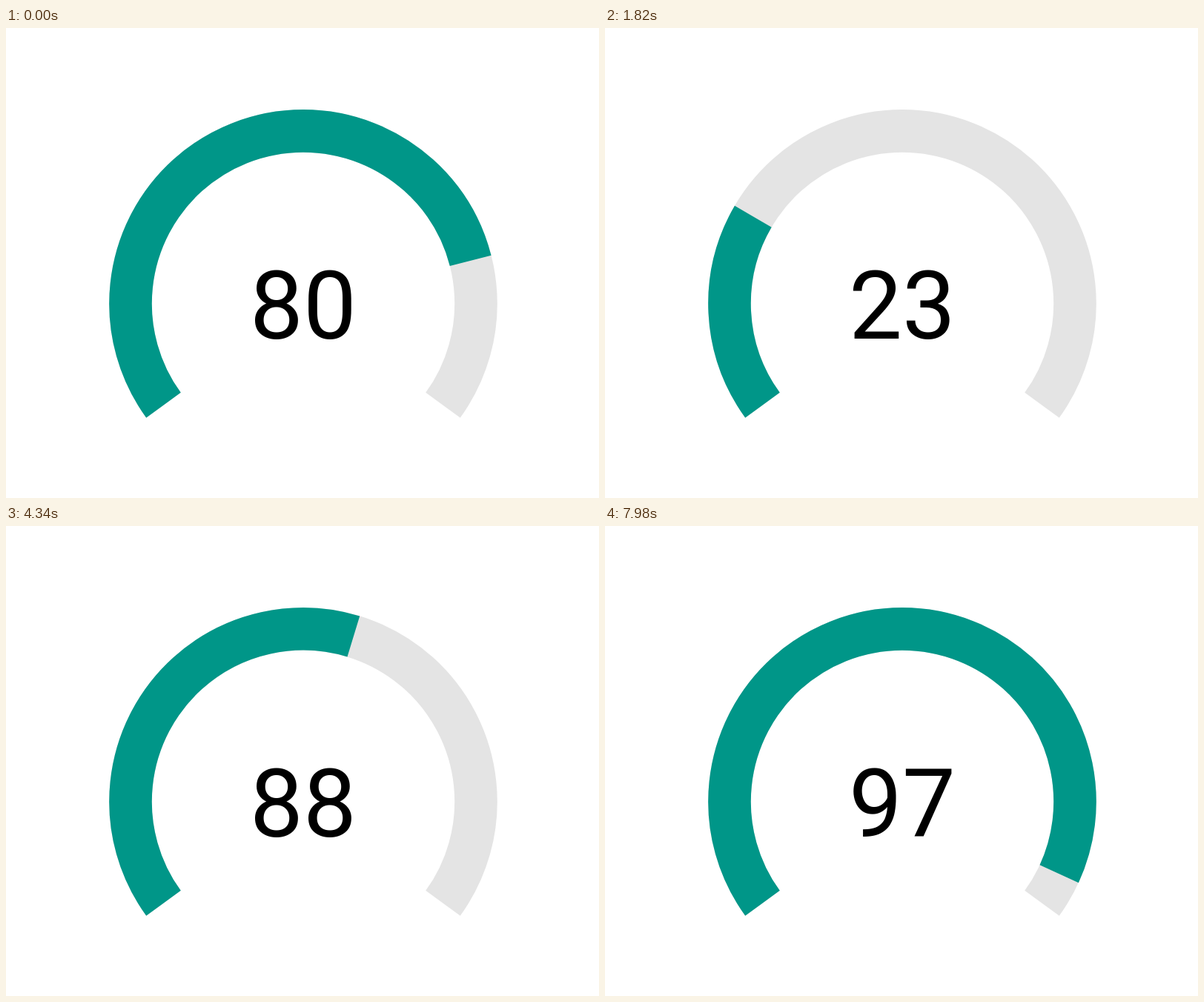
Write an HTML page that moves like this. It is 800 px wide and 634 px high and loops after 8000 ms.

```html
<!DOCTYPE html>
<html lang="en">
<head>
<meta charset="utf-8">
<title>Gauge</title>
<style>
  html, body { margin: 0; width: 100%; height: 100%; overflow: hidden; background: #fff; }
  svg { display: block; width: 800px; height: 634px; }
  path { fill: none; stroke-width: 57.6; }
  text { font: 400 128px Roboto, sans-serif; text-anchor: middle; }
</style>
</head>
<body>
<svg viewBox="0 0 800 634">
  <path d="M212.5 508.8A233 233 0 1 1 589.5 508.8" stroke="#e4e4e4"/>
  <path id="bar" d="M212.5 508.8A233 233 0 1 1 589.5 508.8" stroke="#009688" pathLength="100"/>
  <text id="label" x="401" y="419.3"></text>
</svg>
<script>
const LOOP = 8000, STEP = 70, SWEEP = 2100, FIRST = 80;
const bar = document.getElementById('bar');
const label = document.getElementById('label');

// The number jumps at `jump`; the bar sweeps to the same value from `start` on
const moves = [
  { value: 23, jump: 70, start: 45 },
  { value: 88, jump: 3150, start: 3265 },
  { value: 97, jump: 6300, start: 6440 }
];

const clamp = u => Math.min(1, Math.max(0, u));
const ease = u => (1 - Math.cos(Math.PI * clamp(u))) / 2;

function draw(now) {
  const t = Math.floor(now % LOOP / STEP) * STEP;
  let level = FIRST, number = FIRST;
  for (const { value, jump, start } of moves) {
    level += (value - level) * ease((t - start) / SWEEP);
    if (t >= jump) number = value;
  }
  bar.setAttribute('stroke-dasharray', level + ' 200');
  label.textContent = number;
}

const begin = performance.now();
function tick(now) {
  draw(Math.max(0, now - begin));
  requestAnimationFrame(tick);
}
draw(0);
requestAnimationFrame(tick);
</script>
</body>
</html>
```
